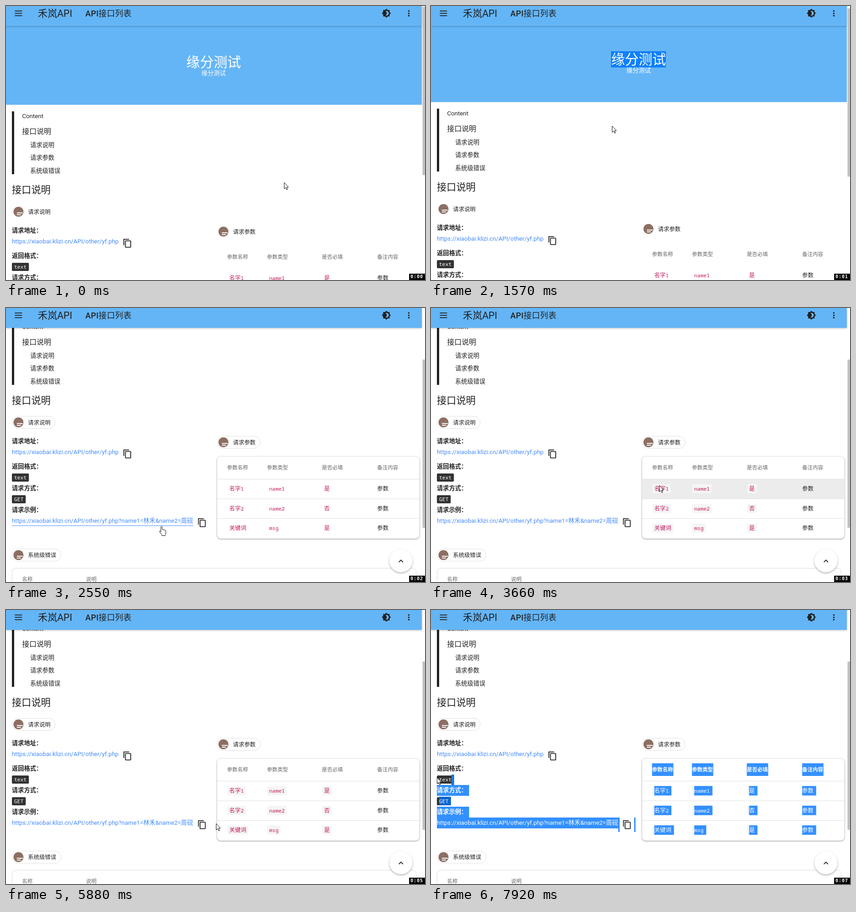
Write an HTML page that moves like this. It is 924x606 px and loops after 8000 ms.

```html
<!DOCTYPE html>
<html lang="zh-CN">
<head>
<meta charset="utf-8">
<title>API</title>
<style>
html, body { margin: 0; width: 100%; height: 100%; overflow: hidden; background: #fff; }
svg { display: block; width: 924px; height: 606px; font-family: Roboto, "Noto Sans CJK SC", "Noto Sans CJK", sans-serif; }
text { white-space: pre; }
.mono { font-family: "Noto Sans Mono", "Noto Sans CJK SC", monospace; font-size: 11.4px; }
.bar { filter: drop-shadow(0 1px 2px rgba(0,0,0,.25)); }
.card { filter: drop-shadow(0 1px 1.5px rgba(0,0,0,.4)); }
.fab { filter: drop-shadow(0 2px 2px rgba(0,0,0,.3)); }
</style>
</head>
<body>
<svg id="stage" viewBox="0 0 924 606"></svg>
<script>
const LOOP = 8000, STEP = 121.5, SCROLL = 202;
const INK = '#212121', GREY = '#666', BLUE = '#64b5f6', LINK = '#448aff', RED = '#c2185b', PICK = '#3390ff';
const stage = document.getElementById('stage');

// Markup helpers; text is placed by its vertical centre.
const rect = (x, y, w, h, fill, more = '') => `<rect x="${x}" y="${y}" width="${w}" height="${h}" fill="${fill}" ${more}/>`;
const text = (x, mid, size, str, fill = INK, more = '') =>
  `<text x="${x}" y="${mid + size * .365}" font-size="${size}" fill="${fill}" ${more}>${str}</text>`;
const code = (x, mid, str, fill) =>
  text(x, mid, 12.44, str.replace(/[a-z\d]+/gi, '<tspan class="mono">$&</tspan>'), fill);
const group = (id, body, more = '') => `<g id="${id}" ${more}>${body}</g>`;
const list = (items, draw) => items.map(draw).join('');
const bold = 'font-weight="700"', mono = 'class="mono"';

const chip = (x, mid, w, str) =>
  rect(x + .5, mid - 13.5, w - 1, 27, 'none', 'class="edge" rx="13.5" stroke="#e0e0e0"') +
  `<circle cx="${x + 14.5}" cy="${mid}" r="11" fill="#8d6e63"/>` +
  `<path d="M${x + 11} ${mid + 2.5}h13m-13 4h9" stroke="#fff" stroke-width="2"/>` +
  text(x + 35.5, mid, 12.44, str);
const tag = (mid, w, str) => rect(13, mid - 9, w, 18, '#333', 'rx="2"') + text(18, mid, 11.4, str, '#fff', mono);
const label = (mid, str, fill) => text(13, mid, 13.33, str, fill, bold);
const link = (mid, str, fill = LINK) => text(13, mid, 13.33, str, fill);
const copyIcon = (x, y) => `<g transform="translate(${x} ${y})" fill="none" stroke="${INK}" stroke-width="1.8">` +
  '<path d="M.9 14V.9H12.5"/><rect x="4.4" y="4.4" width="11.6" height="14.2" rx=".8"/></g>';

const url = 'https://xiaobai.klizi.cn/API/other/yf.php';
const exampleUrl = url + '?name1=林禾&amp;name2=周砚';
const heads = ['参数名称', '参数类型', '是否必填', '备注内容'];
const rows = [['名字1', 'name1', '是', '参数'], ['名字2', 'name2', '否', '参数'], ['关键词', 'msg', '是', '参数']];
const columnX = [487.5, 575.5, 696.5, 818.5], ROW = 43.5, ROWS_TOP = 580.5;
const cells = rows.flatMap((row, r) => row.map((str, c) =>
  ({ str, isCode: c < 3, x: columnX[c] + (c < 3 ? 5 : 0), mid: ROWS_TOP + (r + .5) * ROW - .5 })));
const cellWidth = str => [...str].reduce((w, ch) => w + (ch < '\u0100' ? 6.84 : 12.44), 0);

const hero = rect(0, 0, 917, 218.5, BLUE) + rect(397, 106, 121, 36, '#1080fb', 'id="titlePick"') +
  text(397.5, 124, 30.2, '缘分测试', '#fff') + text(431, 148, 13.4, '缘分测试', '#fff');

const contents = rect(13, 233, 5, 139, INK) + text(35.5, 243, 13.33, 'Content') + text(35.5, 277, 16, '接口说明') +
  list(['请求说明', '请求参数', '系统级错误'], (str, i) => text(53.3, 307 + i * 28.4, 13.33, str)) +
  text(13, 406, 21.33, '接口说明');

const request = chip(13, 455, 96, '请求说明') +
  label(496, '请求地址：') + link(520.5, url) + copyIcon(259, 515) +
  label(552, '返回格式：') + tag(577, 37.5, 'text') + label(600, '请求方式：') + tag(625, 30.5, 'GET') +
  label(648, '请求示例：') + link(672.5, exampleUrl) + copyIcon(423.5, 667) +
  rect(13, 683, 400, 1, LINK, 'id="underline"');

const params = chip(465, 499, 96, '请求参数') +
  rect(465.5, 530.5, 446, 181.5, '#fff', 'class="edge card" rx="8" stroke="#e4e4e4" stroke-width=".6"') +
  rect(465.5, 0, 446, ROW, '#ececec', 'id="hover"') +
  group('codeBack', list(cells.filter(c => c.isCode), c =>
    rect(c.x - 4.5, c.mid - 10, cellWidth(c.str) + 9, 20, '#f5f5f5', 'rx="2"'))) +
  list(rows, (_, r) => rect(465.5, ROWS_TOP + r * ROW - .5, 446, 1, '#e0e0e0', 'class="edge"')) +
  list(heads, (str, i) => text(columnX[i], 554.5, 11.6, str, GREY)) +
  list(cells, c => code(c.x, c.mid, c.str, c.isCode ? RED : INK));

const errors = chip(13, 748.5, 109, '系统级错误') +
  rect(13.5, 777.5, 891, 90, 'none', 'class="edge" rx="8" stroke="#dcdcdc"') +
  text(35.5, 802, 11.6, '名称', GREY) + text(176.5, 802, 11.6, '说明', GREY);

const picked =
  group('pickRows', rect(448, 661, 3, 32, PICK) +
    list(cells, c => rect(c.x, c.mid - 10.5, cellWidth(c.str) + 6, 21, PICK) + code(c.x, c.mid, c.str, '#fff'))) +
  group('pickUrl', rect(13, 661, 400, 24, PICK) + rect(413, 661, 3, 32, PICK) + link(672.5, exampleUrl, '#fff'),
    'clip-path="url(#urlClip)"') +
  group('pickRest',
    list(heads, (str, i) => rect(columnX[i], 541, 47, 28, PICK) + text(columnX[i], 554.5, 11.6, str, '#fff', bold)) +
    list(['请求方式：', '请求示例：'], (str, i) => rect(13, 589 + 48 * i, 71, 24, PICK) + label(600 + 48 * i, str, '#fff')) +
    rect(45, 566, 6, 23, '#1976e0') + rect(18, 615, 26, 19, '#0b66d0') + text(18, 625, 11.4, 'GET', '#fff', mono));

const dots = [11, 16.2, 21.4];
const themeIcon = `<g transform="translate(838.8 16)">` +
  list([0, 45], turn => rect(-7.1, -7.1, 14.2, 14.2, INK, `transform="rotate(${turn})"`)) +
  `<path d="M-2.2-4.8a5.3 5.3 0 1 1 0 9.6a5.3 5.3 0 0 0 0-9.6" fill="${BLUE}"/></g>`;
const appBar = `<g class="bar">${rect(0, -10, 917, 54, BLUE)}</g>` +
  list(dots, y => rect(19.5, y - .9, 16, 1.8, INK) + `<circle cx="888.3" cy="${y}" r="1.8" fill="${INK}"/>`) +
  text(70.3, 16, 21.33, '禾岚API') + text(175, 16.5, 17.78, 'API接口列表', INK, 'letter-spacing=".36" font-weight="500"') +
  themeIcon;

const outline = 'fill="#fff" stroke="#111" stroke-linejoin="round"';
const pointer = `<path id="arrow" d="M.5.5V14.5L3.8 11.4 6 16.5 8 15.6 5.9 10.7H10Z" ${outline}/>` +
  `<path id="hand" d="M-1.5 12V1q1.5-2 3 0V7l6.5 1.2 1.5 1.3V15l-1.5 3.5v2H.5v-2L-5 11q1-2 3.5 1" ${outline}/>` +
  group('beam', '<circle r="9"/><path d="M-3-5.5H3M0-5.5v11M-3 5.5H3"/>', 'fill="none" stroke="#222" stroke-width="1.2"');

stage.innerHTML = '<defs><clipPath id="urlClip"><rect id="urlEdge" y="655" width="416" height="45"/></clipPath></defs>' +
  rect(0, 0, 924, 606, '#fff') + group('page', hero + contents + request + params + errors + picked) + appBar +
  rect(918.5, 0, 5.5, 372, '#c1c1c1', 'id="thumb"') +
  group('fab', `<circle r="25.5" fill="#fff" class="fab"/><path d="M-4.6 3.1 0-1.5 4.6 3.1" fill="none" stroke="${INK}" stroke-width="1.8"/>`) +
  group('pointer', pointer) + rect(889, 592, 35, 14, '#000') +
  text(892, 598.8, 10, '', '#fff', `id="clock" ${bold} letter-spacing="1" font-family="DejaVu Sans Mono, monospace"`);

const el = id => document.getElementById(id);
const setVisible = (node, on) => node.setAttribute('visibility', on ? 'visible' : 'hidden');
const show = (id, on) => setVisible(el(id), on);
const move = (id, x, y, scale = 1) => el(id).setAttribute('transform', `translate(${x} ${y}) scale(${scale})`);
const clamp = (v, low, high) => Math.min(high, Math.max(low, v));
const between = (v, low, high) => v >= low && v <= high;
const edges = [...document.querySelectorAll('.edge')];

// Turning points of the pointer: step, x, y.
const turns = [[1, 613, 390], [4, 543, 119], [5, 520, 118], [10, 388, 118], [13, 399, 265], [14, 401, 274],
  [16, 404, 389], [21, 343, 483], [25, 347, 474], [28, 530, 529], [29, 584, 437], [30, 503, 392], [36, 498, 459],
  [38, 501, 447], [43, 542, 446], [48, 463, 472], [59, 55, 464], [62, 2, 375], [65, 13, 370]];

function pointerAt(step) {
  const i = clamp(turns.findIndex(turn => turn[0] >= step), 1, turns.length - 1);
  const [s0, x0, y0] = turns[i - 1], [s1, x1, y1] = turns[i];
  const u = clamp((step - s0) / (s1 - s0), 0, 1);
  return [x0 + (x1 - x0) * u, y0 + (y1 - y0) * u];
}

function render(time) {
  const step = Math.floor((time + 14) / STEP);
  const [x, y] = pointerAt(step);
  const scroll = SCROLL / (1 + Math.exp((13.566 - step) * 6.16));

  move('page', 0, -scroll);
  el('thumb').setAttribute('y', 2 + scroll * .555);
  edges.forEach(edge => setVisible(edge, scroll > 100));
  const grow = 1 - (1 - clamp((step - 13) / 3, 0, 1)) ** 1.6;
  show('fab', grow > 0);
  move('fab', 871, 562 - 3 * grow, grow);

  const onLink = between(step, 19, 26);
  const onText = between(step, 6, 10) || between(step, 38, 42) || between(step, 50, 58);
  show('hand', onLink);
  show('beam', onText);
  show('arrow', !onLink && !onText);
  move('pointer', x, y);

  show('underline', onLink);
  show('codeBack', step > 27);
  const row = Math.floor((y + scroll - ROWS_TOP) / ROW);
  show('hover', x > 465 && between(row, 0, 2));
  el('hover').setAttribute('y', ROWS_TOP + row * ROW);

  const titleFrom = step > 10 ? 397 : clamp(x, 397, 518);
  show('titlePick', step > 5);
  el('titlePick').setAttribute('x', titleFrom);
  el('titlePick').setAttribute('width', 518 - titleFrom);

  show('pickRows', step > 48);
  show('pickUrl', step > 48);
  show('pickRest', step > 59);
  el('urlEdge').setAttribute('x', step > 59 ? 13 : x);

  el('clock').textContent = '0:0' + Math.floor((step + .5) / 8.25);
}

const start = performance.now();
function frame() {
  render((performance.now() - start) % LOOP);
  requestAnimationFrame(frame);
}
frame();
</script>
</body>
</html>
```
